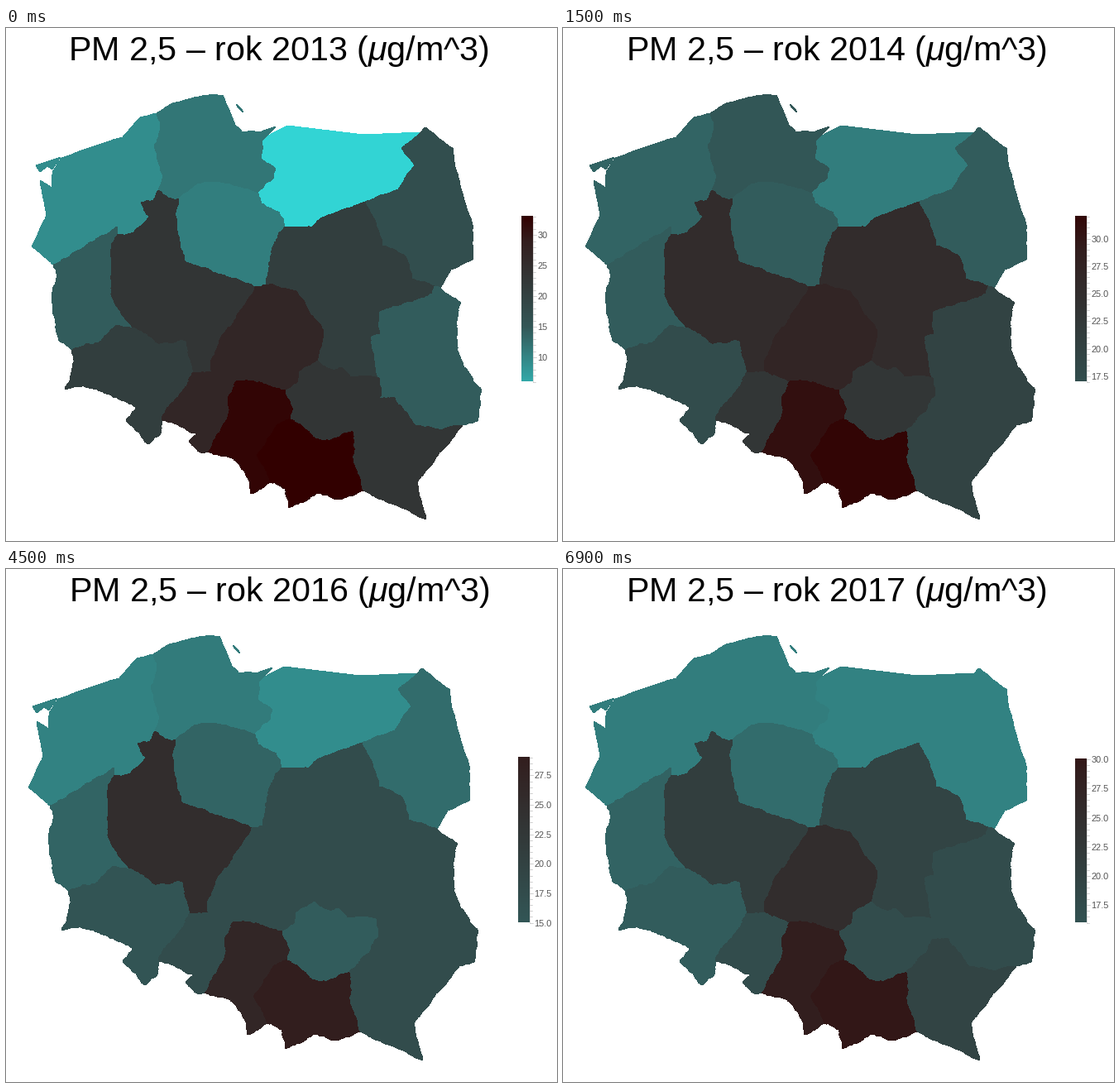
Recreate the animation shown at these times as a matplotlib script. Size 666 by 620 pixels, loop 7500 ms.

```python
import numpy as np
import matplotlib.pyplot as plt
from matplotlib.animation import FuncAnimation
from matplotlib.patches import Polygon

W, H, DPI = 666, 620, 100
plt.rcParams.update({
    "font.family": "Liberation Sans",
    "mathtext.fontset": "custom",
    "mathtext.rm": "Liberation Sans",
    "mathtext.it": "Liberation Sans:italic",
})

fig = plt.figure(figsize=(W / DPI, H / DPI), dpi=DPI, facecolor="white")
ax = fig.add_axes([0, 0, 1, 1])
rng = np.random.default_rng(4)

# Yearly mean of each province
VALUES = {
    "ZP": (9, 13.5, 10.2, 10.2, 10.7),
    "PM": (11.5, 15, 11.7, 11, 10.7),
    "WM": (1.2, 10.7, 10.2, 9, 10.2),
    "PD": (17, 14.3, 14.3, 12.6, 10.2),
    "KP": (10.6, 14.3, 13.6, 13.5, 12.6),
    "LB": (14.3, 14.3, 12.8, 13.5, 13.6),
    "WP": (23.2, 25.5, 25.2, 25.2, 21),
    "MZ": (21, 25.5, 21, 17.5, 19.5),
    "LD": (27, 27.2, 21, 17.5, 25.2),
    "LU": (14.3, 19.8, 21, 17.5, 17.5),
    "DS": (21, 17.5, 14.3, 15.5, 14.3),
    "OP": (27, 23, 17.5, 17.5, 17.5),
    "SL": (32.3, 31, 27, 27, 29),
    "MP": (33, 32.3, 32.3, 29, 30),
    "SW": (23.2, 23, 17.5, 14.3, 17.5),
    "PK": (23.2, 19.8, 21, 17.5, 19.5),
}
RANGES = [(6, 33), (17, 32), (16, 32), (15, 29), (16, 30)]

# Points where borders meet: a to p on the outline, the others inland
NODES = {
    "a": (53, 286), "b": (178, 103), "c": (306, 137), "d": (497, 126),
    "e": (521, 314), "f": (548, 480), "g": (428, 559), "h": (316, 549),
    "i": (240, 512), "j": (184, 473), "k": (76, 389),
    "A": (180, 196), "B": (205, 206), "C": (301, 200), "D": (131, 249),
    "E": (333, 240), "F": (430, 210), "G": (297, 313), "H": (311, 310),
    "I": (514, 312), "J": (149, 362), "K": (222, 416), "L": (245, 416),
    "M": (273, 428), "N": (334, 438), "O": (372, 402), "P": (447, 423),
    "Q": (447, 447), "R": (340, 472), "S": (416, 485),
}
borders = []


def px(n):
    return n * 72 / DPI


def jagged(p, q, amp):
    """Points from p up to q, with midpoints shifted sideways at random."""
    d = q - p
    size = np.hypot(*d)
    if size < 4 or not amp:
        return [p]
    side = np.array([-d[1], d[0]]) / size
    mid = (p + q) / 2 + side * rng.uniform(-amp, amp) * np.sqrt(size)
    return jagged(p, mid, amp) + jagged(mid, q, amp)


def border(owners, ends, *via, amp=0.35):
    start, stop = ends
    keys = np.array([NODES[start], *via, NODES[stop]], float)
    line = [pt for p, q in zip(keys, keys[1:]) for pt in jagged(p, q, amp)]
    borders.append((owners.split(), ends, line + [keys[-1]]))


# Outline of the country, clockwise
border("ZP", "ab", (27, 264), (45, 227), (37, 184), (51, 193), (52, 174),
       (63, 157), (137, 132), (158, 108), amp=0.1)
border("PM", "bc", (197, 91), (236, 81), (258, 81), (273, 117), (281, 125),
       (305, 125), (322, 119), amp=0.1)
border("WM", "cd", (315, 129), (336, 118), (428, 129), amp=0)
border("PD", "de", (503, 120), (537, 146), (538, 162), (560, 238),
       (560, 280), (534, 292), amp=0.15)
border("LU", "ef", (546, 332), (541, 372), (546, 400), (571, 438), (566, 475))
border("PK", "fg", (520, 513), (493, 549), (504, 594), (450, 570), amp=0.2)
border("MP", "gh", (400, 570), (372, 562), (338, 580), (333, 557))
border("SL", "hi", (292, 563), (291, 549), (271, 521))
border("OP", "ij", (233, 514), (217, 500), (227, 491))
border("DS", "jk", (183, 490), (167, 503), (141, 474), (153, 458), (90, 432),
       (67, 436), (77, 408))
border("LB", "ka", (60, 378), (52, 324), (57, 297))

# Borders between provinces
border("ZP PM", "bA", (183, 120), (175, 142), (186, 180))
border("ZP WP", "AD", (174, 208), (159, 211), (169, 228), (150, 248))
border("ZP LB", "aD", (95, 261), (130, 240))
border("PM WM", "cC", (306, 158), (323, 170), (321, 181))
border("PM KP", "CB", (248, 187), (230, 188))
border("PM WP", "AB", (192, 206))
border("KP WM", "CE", (305, 212), (327, 223))
border("KP WP", "BG", (202, 235), (212, 281), (262, 300))
border("KP LD", "GH")
border("KP MZ", "HE", (316, 278), (328, 246))
border("WM MZ", "EF", (366, 240), (378, 229), amp=0.2)
border("WM PD", "Fd", (470, 195), (490, 166), (474, 145), amp=0.2)
border("MZ PD", "FI", (451, 263), (477, 274), (487, 303))
border("PD LU", "Ie")
border("MZ LU", "IP", (511, 321), (448, 343), (449, 370), (437, 374))
border("MZ LD", "HO", (347, 318), (380, 366))
border("MZ SW", "OP", (392, 414), (402, 410), (412, 422))
border("LD WP", "GL", (258, 370), (243, 403))
border("LB WP", "DJ", (122, 270), (124, 325))
border("LB DS", "Jk", (128, 360), (108, 380))
border("DS WP", "JK", (180, 382), (212, 378))
border("DS OP", "jK", (205, 444))
border("OP WP", "KL")
border("OP LD", "LM")
border("OP SL", "Mi", (264, 447), (264, 470))
border("SL LD", "MN", (291, 426))
border("SL SW", "NR", (343, 462))
border("SL MP", "Rh", (325, 478), (300, 515))
border("LD SW", "NO", (350, 428), (350, 416))
border("SW MP", "RS", (372, 496), (388, 497))
border("SW PK", "QS", (440, 462))
border("SW LU", "PQ", (450, 436))
border("LU PK", "Qf", (464, 446), (491, 480), (521, 486))
border("MP PK", "Sg", (416, 520))


def outline(name):
    """Join all borders of a province into one ring."""
    parts = [(ends, pts) for owners, ends, pts in borders if name in owners]
    (_, end), ring = parts.pop(0)
    while parts:
        i = next(i for i, (ends, _) in enumerate(parts) if end in ends)
        (start, stop), pts = parts.pop(i)
        forward = start == end
        ring = ring + (pts if forward else pts[::-1])
        end = stop if forward else start
    return np.array(ring)


shapes = [(name, outline(name)) for name in VALUES]
shapes += [  # island and tip of the peninsula
    ("ZP", np.array([(32, 166), (62, 156), (52, 171), (46, 167), (37, 174)])),
    ("PM", np.array([(274, 92), (280, 97), (283, 102), (277, 97)])),
]


def color(value):
    g = np.interp(value, [0, 15, 29, 33], [223, 86, 30, 0])
    return np.stack([np.full_like(g, 50), g, g], axis=-1) / 255


def draw_bar(x, lo, hi):
    step = 5 if hi - lo > 20 else 2.5
    # Leave room for a label that sits on the upper end
    top, bottom = (228 if hi % step else 230), 427.5
    edge = x + 14

    def y_of(v):
        return bottom + (v - lo) / (hi - lo) * (top - bottom)

    ax.imshow(color(np.linspace(hi, lo, 200))[:, None], aspect="auto",
              extent=(x, edge, bottom, top), interpolation="nearest")
    ax.plot([edge, edge], [top, bottom], color="#c4c4c4", lw=px(0.6))
    for v in np.arange(np.ceil(lo * 5 / step), hi * 5 / step + 0.01) * step / 5:
        major = np.isclose(v / step, round(v / step))
        ax.plot([edge, edge + (4 if major else 2.5)], [y_of(v)] * 2,
                color="#b4b4b4", lw=px(0.6))
        if major:
            ax.text(x + 19.5, y_of(v) + 4, f"{v:.{int(step < 5)}f}",
                    fontsize=px(11), color="#555555")


def draw(year):
    ax.clear()
    lo, hi = RANGES[year]
    # One-decimal labels are wider and push the map to the left
    shift = 4 if hi - lo > 20 else 0
    for name, pts in shapes:
        ax.add_patch(Polygon(pts + (shift, 0), lw=0, antialiased=False,
                             fc=color(VALUES[name][year])))
    draw_bar(619 + shift, lo, hi)
    ax.text(76 - shift / 4, 39, rf"PM 2,5 – rok {2013 + year} ($\mu$g/m^3)",
            fontsize=px(41.3), color="black")
    ax.set(xlim=(0, W), ylim=(H, 0))
    ax.axis("off")
    return []


anim = FuncAnimation(fig, draw, frames=5, interval=1500, repeat=True,
                     repeat_delay=0, init_func=lambda: draw(0))
plt.show()
```
